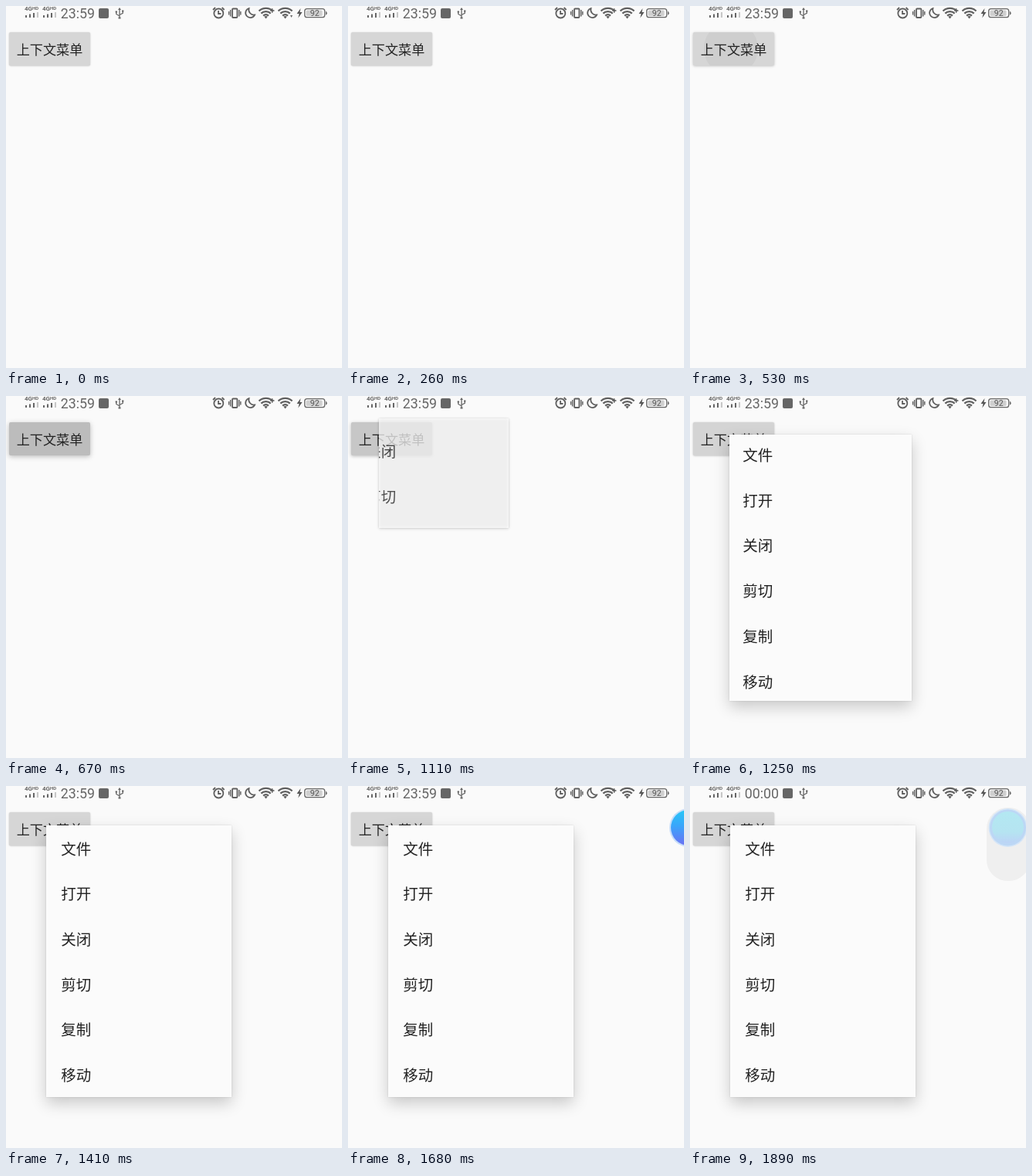
These frames come from a looping animation (435x469 px, 1960 ms). An HTML page:

```html
<!DOCTYPE html>
<html lang="zh-CN">
<head>
<meta charset="utf-8">
<title>上下文菜单</title>
<style>
html, body { margin: 0; width: 100%; height: 100%; overflow: hidden; background: #fafafa; }
body { position: relative; color: #222; font-family: "Noto Sans CJK SC", "Noto Sans CJK", sans-serif; }
svg { position: absolute; left: 0; top: 0; }
#button {
  position: absolute; left: 4px; top: 34px; width: 105px; height: 43px;
  border-radius: 2px; overflow: hidden; background: #d6d6d6;
  font-size: 17.1px; line-height: 43px; text-align: center; white-space: nowrap;
}
#ripple { position: absolute; border-radius: 50%; background: #000; }
#menu { position: absolute; overflow: hidden; }
#items {
  position: absolute; left: 50%; top: 50%; width: 220px; height: 352px;
  margin: -175.4px 0 0 -120.8px; padding-left: 20px;
  font-size: 19.5px; line-height: 58.67px; white-space: nowrap;
}
</style>
</head>
<body>
<div id="button"><div id="ripple"></div><span style="position:relative">上下文菜单</span></div>
<div id="menu"><div id="items">文件<br>打开<br>关闭<br>剪切<br>复制<br>移动</div></div>
<svg width="435" height="469" viewBox="0 0 435 469">
  <defs>
    <linearGradient id="vividFill" x2="0" y2="1">
      <stop offset="0" stop-color="#27c6f6"/><stop offset=".45" stop-color="#3aa5fb"/><stop offset="1" stop-color="#6a70f3"/>
    </linearGradient>
    <linearGradient id="paleFill" x2="0" y2="1">
      <stop offset="0" stop-color="#b3e8f2"/><stop offset=".65" stop-color="#b5e4f1"/><stop offset="1" stop-color="#bcd3f6"/>
    </linearGradient>
    <g id="wifi" fill="none" stroke="#5f5f5f" stroke-width="2.3">
      <path d="M-9 6.5A13 13 0 0 1 9 6.5M-6.2 9.7A9 9 0 0 1 6.2 9.7M-3.4 12.6A5 5 0 0 1 3.4 12.6"/>
      <path d="M0 16.5L-2.2 13.8Q0 12.4 2.2 13.8Z" fill="#5f5f5f" stroke="none"/>
    </g>
    <g id="signal" fill="#666">
      <text y="6" font-family="Roboto, sans-serif" font-weight="700" font-size="8">4G<tspan dy="-1.2" font-size="6">HD</tspan></text>
      <path d="M1 12h2v3h-2zM6 10.5h2v4.5h-2zM11 9h2v6h-2z"/>
      <path d="M16 8h2v7h-2z" opacity=".35"/>
    </g>
  </defs>

  <g id="ball">
    <rect id="track" x="-27.5" y="28" width="56" height="95" rx="27" fill="#efefef"/>
    <g id="vivid">
      <circle cy="54" r="25" fill="#c5ddfa"/>
      <circle cy="54" r="23" fill="url(#vividFill)"/>
    </g>
    <g id="pale">
      <circle cy="54" r="25" fill="#d4e5f7"/>
      <circle cy="54" r="23.5" fill="#bcd7f5"/>
      <circle cy="53.5" r="20.5" fill="url(#paleFill)"/>
    </g>
  </g>

  <use href="#signal" x="24"/>
  <use href="#signal" x="47"/>
  <text id="clock" x="70.7" y="16" fill="#666" font-family="Roboto, sans-serif" font-size="17.8">23:59</text>
  <rect x="120" y="3" width="13" height="13" rx="2" fill="#666"/>

  <g fill="none" stroke="#666" stroke-width="1.3">
    <path d="M147 4v11M147 13l-4.2-2.5V8M147 11.5l4.2-2.2V6.5"/>
    <path d="M147 2l2 3h-4zM145.5 14.5h3v2h-3zM141.6 6.5h2.4v2h-2.4zM150 5.6h2.4v2h-2.4z" fill="#666" stroke="none"/>
  </g>
  <g fill="none" stroke="#5f5f5f" stroke-width="1.8">
    <circle cx="275.3" cy="9.5" r="6"/>
    <path d="M275 6v4h3.4M268 5l3-3M282.6 5l-3-3"/>
    <rect x="293" y="3.5" width="6.4" height="11.5" rx="1"/>
    <path d="M290.6 5v8.5M301.8 5v8.5M288.6 7v4.5M303.8 7v4.5" stroke-width="1.4"/>
    <path d="M314.5 3A6.2 6.2 0 1 0 322 11.5A6.8 6.8 0 0 1 314.5 3Z"/>
    <path d="M342 6h5.4M344.7 3.3v5.4" stroke-width="1.4"/>
  </g>
  <use href="#wifi" x="336.5"/>
  <use href="#wifi" x="361.5"/>
  <path id="activity" d="M368 12h3l-1.5 3z" fill="#666"/>
  <path d="M381.5 3L376.5 10h3l-1.2 5.5L383.5 8h-3z" fill="#555"/>
  <rect x="386.7" y="3.7" width="26" height="11" rx="3" fill="#fafafa" stroke="#666" stroke-width="1.3"/>
  <rect x="388.5" y="5.5" width="21" height="7.5" rx="1.5" fill="#cfcfcf"/>
  <path d="M414 7q1.6 0 1.6 2.2t-1.6 2.2z" fill="#666"/>
  <text x="399.7" y="13" text-anchor="middle" fill="#555" font-family="Roboto, sans-serif" font-size="10.5">92</text>
</svg>
<script>
const LOOP = 1960;
const STEPS = [0, 260, 530, 600, 670, 1110, 1180, 1250, 1320, 1390, 1460, 1610, 1680, 1750, 1820, 1890];
const el = id => document.getElementById(id);
const clamp = v => Math.min(1, Math.max(0, v));
const style = (id, props) => Object.assign(el(id).style, props);

function drawButton(t) {
  const growth = clamp((t - 460) / 210);
  const press = t < 1110 ? growth : 0.6 * clamp(1 - (t - 1110) / 160);
  const r = 105 * growth;
  style('ripple', {
    left: 49 - r + 'px', top: 21 - r + 'px', width: 2 * r + 'px', height: 2 * r + 'px',
    opacity: 0.12 * press
  });
  style('button', { boxShadow: `0 ${0.5 + press}px ${2 + 4 * press}px rgba(0,0,0,.25)` });
}

function drawMenu(t) {
  const open = t >= 1110;
  style('menu', { display: open ? 'block' : 'none' });
  if (!open) return;
  // Each edge closes in exponentially on its resting value.
  const settle = (end, gap, ratio) => end - (t < 1390 ? gap * ratio ** ((t - 1110) / 140) : 0);
  const height = settle(352, 210, 0.033);
  const lift = clamp((height - 142) / 203);
  const shade = 237 + 14 * lift;
  style('menu', {
    left: settle(52, 12, 0.083) + 'px',
    top: settle(51, 22, 0.045) + 'px',
    width: settle(240, 72, 0.055) + 'px',
    height: height + 'px',
    opacity: 0.78 + 0.22 * lift,
    background: `rgb(${shade},${shade},${shade})`,
    boxShadow: `0 ${1 + 7 * lift}px ${4 + 15 * lift}px rgba(0,0,0,.2), 0 0 2px rgba(0,0,0,.14),
      inset 0 0 4px rgba(255,255,255,${0.9 * (1 - lift)})`
  });
}

function drawBall(t) {
  const p = clamp((t - 1680) / 210);
  const slide = 1 - (1 - p) ** 2;
  el('ball').setAttribute('transform', `translate(${441 - 29.5 * slide} 0)`);
  style('ball', { display: t >= 1680 ? 'inline' : 'none' });
  style('track', { opacity: p });
  style('vivid', { opacity: 1 - p });
  style('pale', { opacity: p });
}

function frame(now) {
  const time = now % LOOP;
  const t = STEPS.findLast(step => step <= time);
  style('activity', { display: t < 260 ? 'inline' : 'none' });
  el('clock').textContent = t < 1820 ? '23:59' : '00:00';
  drawButton(t);
  drawMenu(t);
  drawBall(t);
  requestAnimationFrame(frame);
}
frame(0);
</script>
</body>
</html>
```
